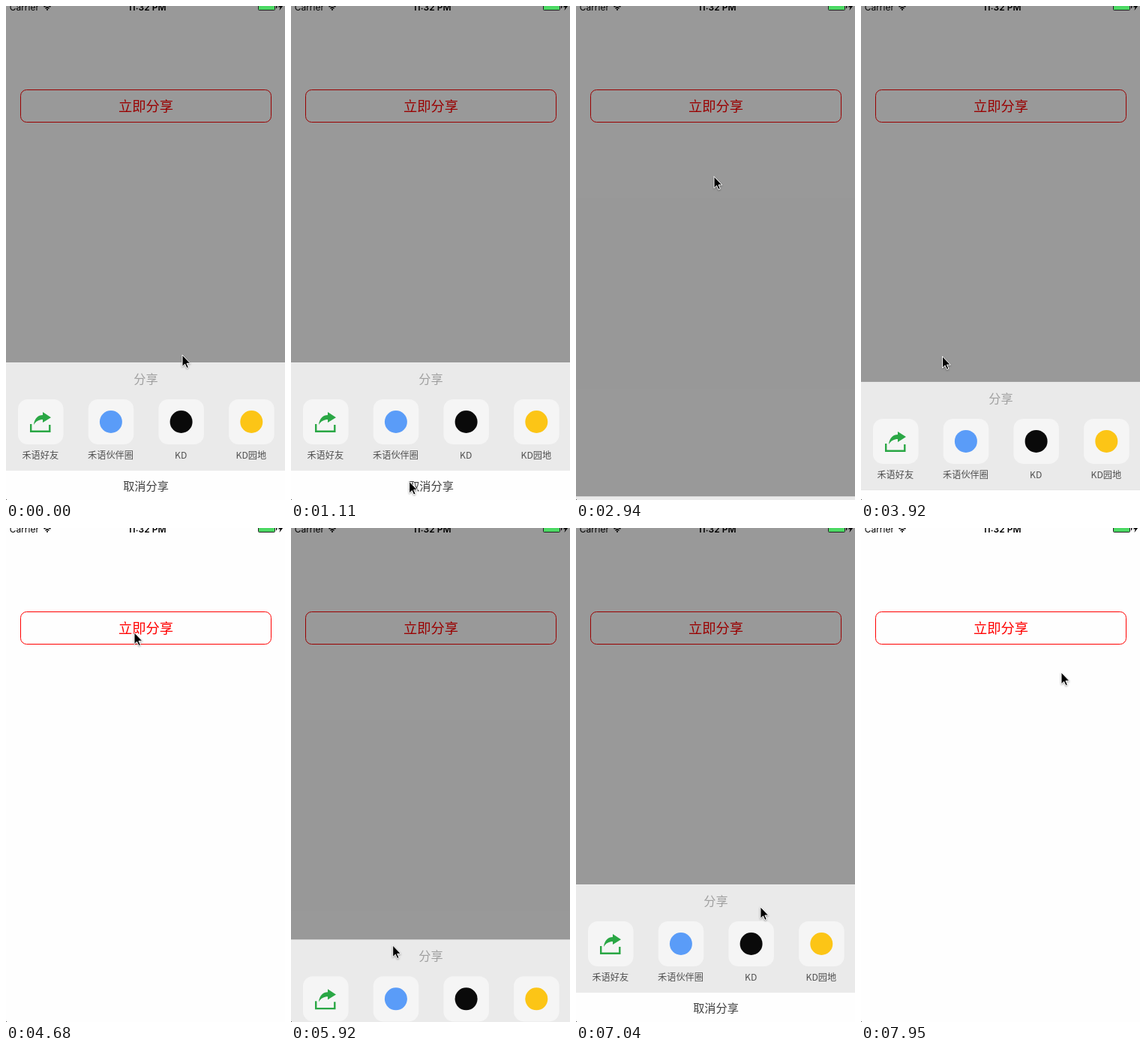
Write an HTML page that moves like this. It is 372 by 657 pixels and loops after 8000 ms.

```html
<!DOCTYPE html>
<html lang="zh-CN">
<head>
<meta charset="utf-8">
<title>分享面板</title>
<style>
  html, body { margin: 0; width: 100%; height: 100%; overflow: hidden; background: #fefefe; }
  svg { display: block; width: 100%; height: 100%; }
  text { font-family: "Noto Sans CJK SC", "Noto Sans CJK", sans-serif; font-weight: 350; text-anchor: middle; }
  .status text { font: 12px Inter, sans-serif; }
  #cursor { filter: drop-shadow(0 1px 1px rgba(0, 0, 0, .35)); }
</style>
</head>
<body>
<svg viewBox="0 0 372 657">
  <rect width="372" height="657" fill="#fefefe"/>
  <rect x="19.5" y="111.5" width="334" height="43" rx="8" fill="none" stroke="#f00"/>
  <text x="186.5" y="139.8" font-size="18.3" fill="#f00">立即分享</text>
  <rect id="dim" width="372" height="657" fill-opacity=".4"/>

  <g id="panel">
    <rect y="474" width="372" height="144" fill="#eaeaea"/>
    <rect y="618" width="372" height="39" fill="#fefefe"/>
    <text x="186.5" y="502" font-size="16.2" fill="#a0a0a0">分享</text>
    <g id="tiles"></g>
    <path d="M37 557C38 548 43 544 49 544V540L60 547.2L49 554V550C44 550 40 552 37 557Z" fill="#2aa745"/>
    <path d="M33.2 556V565.8H58.3V557" fill="none" stroke="#2aa745" stroke-width="2.4"/>
    <text id="cancel" x="186.5" y="643.7" font-size="15.2">取消分享</text>
  </g>

  <g class="status">
    <text x="24.3" y="6">Carrier</text>
    <text x="188" y="6" style="font-weight:600">11:32 PM</text>
    <path d="M50.6 1.2Q55 -2.6 59.4 1.2M52.5 3.2Q55 1 57.5 3.2" fill="none" stroke="#000" stroke-width="1.5"/>
    <circle cx="55" cy="4.8" r="1.1"/>
    <rect x="336.5" y="-5.5" width="22" height="11" rx="1" fill="#4cd964" stroke="#222"/>
    <path d="M360 -1.5V3.5Q361.5 2.5 361.5 1T360 -1.5ZM367 -5L363 1.5H365.6L364.5 6L369.5 -.5H366.6L368 -5Z"/>
  </g>
  <rect y="656" width="1" height="1" fill="#555"/>
  <path id="cursor" d="M0 0V15.6L3.6 12.2L6 17.6L8.4 16.5L6 11.3H10.8Z" stroke="#fff"/>
</svg>
<script>
const $ = id => document.getElementById(id);
const LOOP = 8000, SLIDE = 300, HEIGHT = 183, GAP = 93.7;

const apps = [['禾语好友'], ['禾语伙伴圈', '#5a9cf8'], ['KD', '#0a0a0a'], ['KD园地', '#fcc516']];
$('tiles').innerHTML = apps.map(([label, color], i) => `<g transform="translate(${16 + i * GAP})">
  <rect y="523" width="60.5" height="60" rx="13" fill="#f5f5f5"/>
  ${color ? `<circle cx="30.2" cy="553" r="15" fill="${color}"/>` : ''}
  <text x="29.8" y="602.4" font-size="12.2" fill="#505050">${label}</text></g>`).join('');

// The panel starts open; each tap toggles it
const taps = [1640, 2890, 3850, 4880, 5791, 6710, 7480];

// Pointer rests: arrive, leave, x, y
const icon = i => [42 + i * GAP, 555];
const stops = [
  [0, 60, 235, 464],
  [810, 990, 114, 585],
  [1220, 1728, 160, 638],
  [2380, 2530, 185, 160],
  [2740, 2890, 174, 143],
  [3590, 3860, ...icon(0)],
  [4650, 4880, 171, 139],
  [5630, 5930, ...icon(1)],
  [6440, 6710, 173, 142],
  [7370, 7480, ...icon(2)],
  [7950, LOOP, 267, 192]
];

const clamp = p => Math.max(0, Math.min(1, p));
const easeInOut = p => p * p * (3 - 2 * p);
const easeOut = p => 1 - (1 - p) ** 3;

// Each move slows down at its end and bows to the right
function pointer(t) {
  const i = stops.findLastIndex(s => s[0] <= t);
  const [, leave, x, y] = stops[i];
  const [arrive, , x2, y2] = stops[i + 1] || stops[i];
  if (t <= leave) return [x, y];
  const p = easeOut((t - leave) / (arrive - leave));
  const bow = .15 * Math.abs(y2 - y) * Math.sin(Math.PI * p);
  return [x + (x2 - x) * p + bow, y + (y2 - y) * p];
}

function draw() {
  const t = (performance.now() - origin) % LOOP;
  const count = taps.filter(s => s <= t).length;
  const open = count % 2 === 0;
  const age = count ? t - taps[count - 1] : LOOP;
  const p = easeInOut(clamp((age - (open ? 22 : 0)) / SLIDE));
  $('panel').setAttribute('transform', `translate(0 ${HEIGHT * (open ? 1 - p : p)})`);
  $('dim').setAttribute('visibility', open || age < SLIDE + 60 ? 'visible' : 'hidden');
  $('cancel').setAttribute('fill', t >= 1430 && t < 1580 ? '#c4c4c4' : '#404040');
  $('cursor').setAttribute('transform', `translate(${pointer(t)})`);
  requestAnimationFrame(draw);
}
const origin = performance.now();
draw();
</script>
</body>
</html>
```
